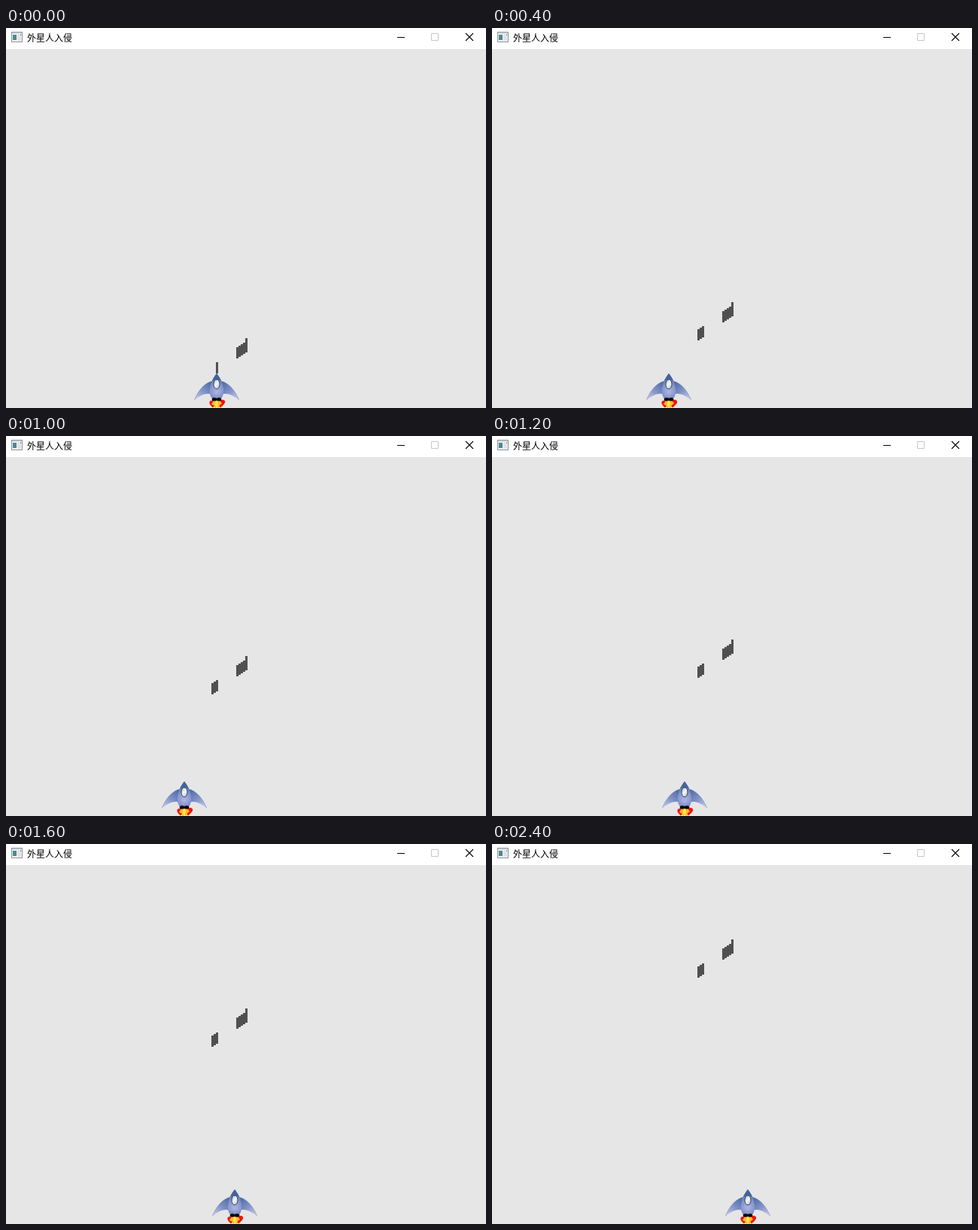
An HTML page with a canvas for the animation above (2500 ms loop, 638 by 506 pixels).

```html
<!DOCTYPE html>
<html lang="zh-CN">
<head>
<meta charset="utf-8">
<title>外星人入侵</title>
<style>
html, body { margin: 0; width: 100%; height: 100%; overflow: hidden; background: #e6e6e6; }
canvas { position: absolute; left: 0; top: 0; display: block; }
#title {
  position: absolute; left: 28px; top: 4px;
  font: 12px/18px "Noto Sans CJK SC", "Noto Sans CJK", "Noto Sans CJK JP", sans-serif;
  color: #000; white-space: nowrap;
}
</style>
</head>
<body>
<canvas id="stage" width="638" height="506"></canvas>
<div id="title">外星人入侵</div>
<script>
const ctx = document.getElementById('stage').getContext('2d');
const STEP = 100, STEPS = 25;

// [step, value] pairs
const shipKeys = [[0, 280], [2, 250], [4, 235], [6, 214], [7, 214], [8, 217],
                  [12, 256], [16, 304], [20, 340], [24, 340]];
const riseKeys = [[0, 0], [4, 48], [8, 96], [12, 142], [16, 194], [18, 214], [19, 228], [24, 286]];

function valueAt(keys, n) {
  let i = 1;
  while (i < keys.length - 1 && keys[i][0] < n) i++;
  const [n0, a] = keys[i - 1], [n1, b] = keys[i];
  return a + (b - a) * (n - n0) / (n1 - n0);
}

function rect(x, y, w, h, color) {
  ctx.fillStyle = color;
  ctx.fillRect(x, y, w, h);
}

function path(d, fill, stroke, width = 1) {
  const p = new Path2D(d);
  if (fill) { ctx.fillStyle = fill; ctx.fill(p); }
  if (stroke) { ctx.strokeStyle = stroke; ctx.lineWidth = width; ctx.stroke(p); }
}

function ellipse(x, y, rx, ry, fill, stroke) {
  ctx.beginPath();
  ctx.ellipse(x, y, rx, ry, 0, 0, Math.PI * 2);
  ctx.fillStyle = fill;
  ctx.fill();
  if (stroke) { ctx.strokeStyle = stroke; ctx.lineWidth = 1; ctx.stroke(); }
}

function blend(g, colors) {
  colors.forEach((c, i) => g.addColorStop(i / (colors.length - 1), c));
  return g;
}

const wingFill = blend(ctx.createLinearGradient(-7, 14, -28, 36), ['#526ea6', '#8496ca', '#cfcff0']);
const bodyFill = blend(ctx.createRadialGradient(0, 25, 1, 0, 21, 17), ['#a9b2e2', '#8795cc', '#4c68a0']);
const glass = blend(ctx.createLinearGradient(-4, 10, 4, 18), ['#b9c9cf', '#f4f6f8', '#c4cdd6']);

function drawWing(side) {
  ctx.save();
  ctx.scale(side, 1);
  path('M-5 10 C-16 12 -24 22 -30 36 C-23 30 -15 25 -6 28 Z', wingFill);
  path('M-6 10.5 C-16 12.5 -24 22 -29.5 35', null, 'rgba(92,114,166,.6)', .8);
  ctx.restore();
}

function drawShip(x) {
  ctx.save();
  ctx.translate(x, 460);
  path('M-6 36 C-11 36 -11 41 -5 45.5 L0 40 L5 45.5 C11 41 14 36 8 35 Z', '#e8180c');
  path('M-4 36 L-7 41 L-3 43 L-2 47 L0 44 L3 47 L4 42 L7 40 L4 36 Z', '#ffbf20');
  path('M-1.5 37 L-2 42 L0 45 L2 41 L1.5 37 Z', '#ffe65c');
  drawWing(-1);
  drawWing(1);
  path('M0 0 C3 4 6 8 7.5 13 C10 22 10 29 5.5 34 L-5.5 34 C-10 29 -10 22 -7.5 13 C-6 8 -3 4 0 0 Z', bodyFill);
  path('M0 0 C3 4 5 7 6 10 Q0 6 -6 10 C-5 7 -3 4 0 0 Z', '#46639a');
  ellipse(0, 14.3, 4, 6.3, glass, '#34435f');
  ellipse(-3, 34.5, 3.3, 2.2, '#080808');
  ellipse(3, 34.5, 3.3, 2.2, '#080808');
  ctx.restore();
}

function bullet(x, y) {
  rect(x, y, 3, 15, '#505050');
}

function drawBullets(n) {
  const rise = 2 * Math.round(valueAt(riseKeys, n) / 2);
  for (let i = 0; i < 5; i++) bullet(306 + 3 * i, 425 - 2 * i - rise);
  bullet(318, 413 - rise);
  for (let i = n ? 0 : 2; i < 3; i++) bullet(273 + 3 * i, 449 - 2 * i - rise);
}

function drawBar() {
  rect(0, 0, 638, 28, '#fff');
  // app icon
  rect(7, 5, 15, 14, '#8d9499');
  rect(8, 6, 13, 12, '#f1f3f4');
  rect(8, 6, 13, 2, '#d5dade');
  rect(9, 9, 5, 7, '#4f8790');
  rect(15, 9, 5, 8, '#dfe3e6');
  rect(19, 8, 1, 2, '#8d9499');
  // window buttons
  rect(520, 12, 10, 1, '#000');
  path('M565.5 7.5 h9 v9 h-9 Z', null, '#c8c8c8');
  path('M611 7 L621 17 M621 7 L611 17', null, '#000', 1.1);
}

function frame() {
  const n = Math.floor(performance.now() / STEP) % STEPS;
  rect(0, 0, 638, 506, '#e6e6e6');
  drawBar();
  drawBullets(n);
  drawShip(Math.round(valueAt(shipKeys, n)));
  requestAnimationFrame(frame);
}
frame();
</script>
</body>
</html>
```
